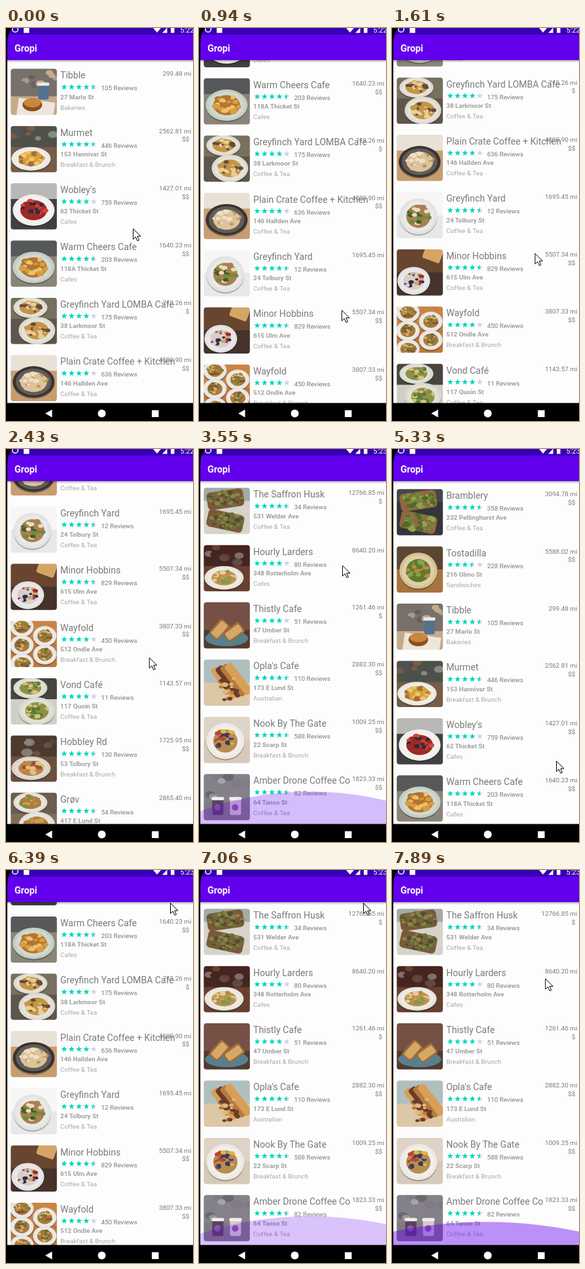
These frames come from a looping animation (286 by 600 pixels, 8 s). An HTML page:

```html
<!DOCTYPE html>
<html lang="en">
<head>
<meta charset="utf-8">
<title>Cafe list</title>
<style>
  html, body { margin: 0; width: 100%; height: 100%; overflow: hidden; background: #000; }
  svg { display: block; width: 286px; height: 600px; }
  text { font: 9.9px Roboto, sans-serif; fill: #7a7a7a; }
  .name { font-size: 14.1px; }
  .addr { font-weight: 700; fill: #a0a0a0; }
  .cat { fill: #a8a8a8; }
  .bar { font-size: 14.3px; font-weight: 700; fill: #fff; }
  .clock { font-size: 11px; fill: #fff; }
  .end { text-anchor: end; }
  .photo { filter: blur(.5px); }
</style>
</head>
<body>
<svg viewBox="0 0 286 600">
  <defs>
    <clipPath id="round"><rect width="70.5" height="70.5" rx="4"/></clipPath>
    <clipPath id="view"><rect x="2" y="49" width="284" height="524"/></clipPath>
    <linearGradient id="shade" x2="0" y2="1">
      <stop stop-opacity=".3"/><stop offset="1" stop-opacity="0"/>
    </linearGradient>
  </defs>
  <rect width="286" height="600" fill="#fdfdfd"/>
  <g clip-path="url(#view)">
    <g id="list"></g>
    <ellipse id="top" rx="426" fill="#6200ee"/>
    <ellipse id="bottom" rx="426" fill="#6200ee"/>
  </g>
  <rect y="49" width="286" height="4" fill="url(#shade)"/>
  <rect y="10" width="286" height="39" fill="#6200ee"/>
  <rect width="286" height="10" fill="#3700b3"/>
  <text class="bar" x="13" y="36">Gropi</text>
  <circle cx="14" cy="2" r="4.3" fill="#3700b3" stroke="#fff" stroke-width="1.5"/>
  <path d="M27 0h8.500v7.500h-8.500zM225 0h12l-6 7zM239 7.500l7.500-8v8zM252 0h5.500v7.500h-5.500z" fill="#fff"/>
  <text class="clock" id="clock" x="266.500" y="6.500"></text>
  <path d="M0 0H10Q2 7 2 25V572.400H286V600H0Z"/>
  <path d="M60 588.500l10.500-6v12zM223 583.500h10.500v10.500h-10.500z" fill="#fff"/>
  <circle cx="146.500" cy="588.500" r="6" fill="#fff"/>
  <path id="cursor" d="M0 0V16L3.800 12.500L6.500 18.500L9 17.400L6.400 11.500H11.500Z" fill="#fff" stroke="#000"/>
</svg>
<script>
const $ = id => document.getElementById(id);
const LOOP = 8000, TICK = 135.8, PITCH = 87.4, TOP = 61;

// Pictures: each layout fills a 70 unit square from a palette of
// backdrop, table, dish and food colours
let seed = 7;
const rnd = () => (seed = seed * 16807 % 2147483647) / 2147483647;
const oval = (x, y, rx, ry, fill) => `<ellipse cx="${x}" cy="${y}" rx="${rx}" ry="${ry}" fill="${fill}"/>`;
const box = (x, y, w, h, fill, turn = 0, r = 0) =>
  `<rect x="${x}" y="${y}" width="${w}" height="${h}" rx="${r}" fill="${fill}" transform="rotate(${turn} ${x + w / 2} ${y + h / 2})"/>`;
const repeat = (n, make) => Array.from({ length: n }, (_, i) => make(i)).join('');

const bits = (n, x, y, rx, ry, size, fills) => repeat(n, i => {
  const a = rnd() * 2 * Math.PI, d = Math.sqrt(rnd()), s = size * (.6 + rnd() * .8);
  return oval((x + Math.cos(a) * d * rx).toFixed(1), (y + Math.sin(a) * d * ry).toFixed(1),
    s.toFixed(1), (s * .7).toFixed(1), fills[i % fills.length]);
});
const room = ([back, table], y) => box(-5, -5, 81, 81, table) + box(-5, -5, 81, y + 5, back);
const blurs = (c, y) => bits(10, 35, y / 2, 36, y / 2, 7, [c[0], c[1], '#5558', '#ddd6']);
const dish = (x, y, r, c, tilt = .75) => {
  const [, , rim, food, ...rest] = c;
  return oval(x, y + 2, r, r * tilt, '#0004') + oval(x, y, r, r * tilt, rim) +
    oval(x, y, r * .85, r * tilt * .85, '#fff3') + oval(x, y, r * .64, r * tilt * .64, food) +
    bits(26, x, y - 1, r * .6, r * tilt * .55, r * .13, [food, ...rest]);
};
const cup = (x, y, w, body, lid) =>
  box(x, y, w, w * 1.5, body, 0, 3) + box(x - 1, y - 2, w + 2, 5, lid, 0, 2);

const layouts = {
  plate: c => room(c, 24) + dish(35, 41, 32, c),
  round: c => room(c, 35) + dish(33, 37, 29, c, .95),
  low: c => room(c, 32) + blurs(c, 32) + dish(31, 50, 30, c, .6),
  cafe: c => room(c, 42) + blurs(c, 42) + box(10, 48, 56, 30, '#eee6da', 8) +
    oval(33, 55, 15, 10, c[4]) + oval(33, 52, 13, 7, c[3]) + cup(42, 23, 16, c[2], '#ece8e2'),
  pair: c => room(c, 32) + dish(30, 15, 26, c, .6) + dish(40, 50, 28, c),
  toastAndBowl: c => room(c, 35) + box(42, -8, 28, 26, c[4], 20, 3) + dish(26, 48, 25, c, .85),
  spread: c => room(c, 35) + repeat(5, i => dish(17 + i % 2 * 35, 9 + i * 14, 18, c, .85)),
  toast: c => room(c, 20) + repeat(2, i => box(5, 4 + i * 33, 56, 27, c[2], i ? 12 : -8, 6) +
    bits(48, 34, 17 + i * 34, 26, 12, 3.2, c.slice(3))),
  sandwich: c => room(c, 42) + oval(35, 55, 33, 12, c[2]) +
    repeat(2, i => box(9 + i * 22, 32 + i * 4, 30, 19, c[4], -48 + i * 12, 3) +
      box(11 + i * 22, 35 + i * 4, 26, 13, c[3], -48 + i * 12, 3)),
  stack: c => room(c, 35) + repeat(4, i => box(4 + i * 7, 29 - i * 2, 56, 13, c[2 + i % 3], 52, 4)) +
    bits(16, 36, 42, 15, 20, 4, c.slice(3)),
  cups: c => room(c, 42) + blurs(c, 40) + repeat(2, i => cup(13 + i * 27, 37, 17, c[2 + i], '#f2edf1') +
    oval(21 + i * 27, 51, 5, 5, c[4]))
};

const TEA = 'Coffee & Tea', CAFE = 'Cafes', BRUNCH = 'Breakfast & Brunch';
// name, address, category, stars, reviews, miles, price, layout, palette
const cafes = [
  ['Bramblery', '232 Pellinghurst Ave', TEA, 4.5, 358, '3094.78', '$$', 'toast', '#45474a #33363a #8f6842 #6d8a35 #8fa648 #4f6a2a'],
  ['Tostadilla', '216 Olmo St', 'Sandwiches', 3.5, 228, '5588.02', '$$', 'round', '#5a4632 #a4743f #d8c193 #5f7a30 #c08a42 #88a445'],
  ['Tibble', '27 Marlo St', 'Bakeries', 4.5, 105, '299.48', '', 'cafe', '#77706b #c3aa8b #53718f #c8873e #8c501f'],
  ['Murmet', '153 Hannivar St', BRUNCH, 4.5, 446, '2562.81', '$$', 'low', '#4d5149 #765c49 #ebe8e3 #d9a23d #efc768 #a46e3b'],
  ["Wobley's", '62 Thicket St', CAFE, 4, 759, '1427.01', '$$', 'plate', '#b9b8b6 #413f40 #f0efed #9f2a24 #d0443a #2f2b42'],
  ['Warm Cheers Cafe', '118A Thicket St', CAFE, 4.5, 203, '1640.23', '$$', 'plate', '#57585a #8b8479 #c4cfc4 #b2762f #d99d41 #edc06c'],
  ['Greyfinch Yard LOMBA Cafe', '38 Larkmoor St', TEA, 4, 175, '718.26', '$', 'pair', '#77705f #5e554d #dedad0 #c39546 #e6cf94 #6a4a3a'],
  ['Plain Crate Coffee + Kitchen', '146 Hallden Ave', TEA, 4, 636, '4500.90', '$$', 'plate', '#e8e1d6 #c79d70 #383431 #dcc39b #f0dfc2 #c1935a'],
  ['Greyfinch Yard', '24 Tolbury St', TEA, 4.5, 12, '1695.45', '', 'round', '#f7f6f5 #e9e8e8 #e4e3e4 #a9814f #6e8b3d #e9ddbb #435d2b'],
  ['Minor Hobbins', '615 Ulm Ave', TEA, 4.5, 829, '5507.34', '$$', 'toastAndBowl', '#68452f #45332b #e4e1e2 #d6cfce #d5a566 #9b2d34 #2f2d42'],
  ['Wayfold', '512 Ondle Ave', BRUNCH, 4, 450, '3807.33', '$$', 'spread', '#c88445 #bd783c #e7e5e1 #aa7b3b #dcb871 #885132 #637a3a'],
  ['Vond Café', '117 Quoin St', TEA, 4, 11, '1143.57', '', 'pair', '#48443f #cfcfc6 #d8dacd #8d9148 #d9c379 #5d7a3a'],
  ['Hobbley Rd', '53 Tolbury St', BRUNCH, 4.5, 130, '1725.95', '$$', 'low', '#4c3a2e #6d503b #d8d3c8 #bd8548 #e3be85 #995231'],
  ['Grøv', '417 E Lund St', TEA, 4.5, 54, '2865.40', '', 'pair', '#6b5d50 #846c56 #e1ded8 #b27a3d #7a9144 #d09b57'],
  ['The Saffron Husk', '531 Welder Ave', TEA, 4.5, 34, '12766.85', '$', 'toast', '#a5aaa6 #d5d3ca #795a38 #6d6e3c #4d502c #8a8449'],
  ['Hourly Larders', '348 Rotterholm Ave', CAFE, 4, 80, '8640.20', '', 'low', '#45251f #68402f #e8e4de #c78f4d #82994d #e4cd9b'],
  ['Thistly Cafe', '47 Umber St', BRUNCH, 4, 51, '1261.46', '$', 'sandwich', '#765045 #54392e #56808f #d6a867 #a06b37'],
  ["Opla's Cafe", '173 E Lund St', 'Australian', 4.5, 110, '2882.30', '$$', 'stack', '#aebfbe #dcc8a7 #d79f57 #693c2b #b77a3d #e0b878'],
  ['Nook By The Gate', '22 Scarp St', BRUNCH, 4.5, 588, '1009.25', '$$', 'round', '#ddd3c6 #d6c9b9 #eeeae3 #b68d54 #e0b648 #b74637 #3d395a'],
  ['Amber Drone Coffee Co', '64 Tanso St', TEA, 4.5, 82, '1823.33', '$$', 'cups', '#84818a #817a82 #5a425b #d9c8ce #8a5aaf']
];

// A half star keeps only the points left of its centre line
const star = (fill, half) => `<polygon fill="${fill}" points="${Array.from({ length: half ? 6 : 10 }, (_, i) => {
  const a = i * Math.PI / 5, r = i % 2 ? 2 : 4.8;
  return [-r * Math.sin(a), -r * Math.cos(a)].map(v => v.toFixed(2));
}).join(' ')}"/>`;

const stars = score => repeat(5, i => {
  const left = score - i;
  return `<g transform="translate(${(89 + i * 11.3).toFixed(1)} 28.2)">` +
    (left < 1 ? star('#d3d3d3') : '') + (left > 0 ? star('#00d6be', left < 1) : '') + '</g>';
});

$('list').innerHTML = cafes.map(([name, addr, cat, score, count, miles, price, layout, palette], i) => `
  <g transform="translate(0 ${(TOP + i * PITCH).toFixed(1)})">
    <g transform="translate(7.3 .3)" clip-path="url(#round)">
      <g class="photo">${layouts[layout](palette.split(' '))}</g>
    </g>
    <text class="name" x="83" y="15.300">${name}</text>${stars(score)}
    <text x="145.500" y="33.300">${count} Reviews</text>
    <text class="addr" x="83" y="46.500">${addr}</text>
    <text class="cat" x="83" y="62.500">${cat}</text>
    <text class="end" x="283.300" y="11.300">${miles} mi</text>
    <text class="end" x="280.300" y="24">${price}</text>
  </g>`).join('');

// The pointer reaches y0 at `ready`, drags to (x, y1) between `from` and `to`,
// then the list glides `toss` further until `stop`
const gestures = [
  { ready: 260, from: 410, to: 670, x: 218.5, y0: 421, y1: 270, toss: 112.5, stop: 1060 },
  { ready: 930, from: 1200, to: 1610, x: 219, y0: 431, y1: 310, toss: 23, stop: 2030 },
  { ready: 1870, from: 2332, to: 2585, x: 219.5, y0: 431, y1: 178, toss: 430, stop: 3430 },
  { ready: 2600, from: 3600, to: 3900, x: 226, y0: 178, y1: 369, toss: -681, stop: 4490 },
  { ready: 4630, from: 4900, to: 5290, x: 251.5, y0: 109.5, y1: 476.5, toss: -20, stop: 5600 },
  { ready: 5300, from: 6010, to: 6380, x: 251.5, y0: 476.5, y1: 50.5, toss: 1100, stop: 7060 },
  { ready: 7350, from: 7500, to: 7880, x: 234.5, y0: 479, y1: 163, toss: 0, stop: 7990 }
];
const START = 173.8, END = 1225.6, SLOP = 7, RETURN = 120, FADE = 540;
const clamp = (v, lo, hi) => Math.min(hi, Math.max(lo, v));
const part = (t, a, b) => clamp((t - a) / (b - a), 0, 1);
const mix = (a, b, p) => a + (b - a) * p;
const NONE = { height: 0, alpha: 0, x: 144 };

function stateAt(t) {
  const now = { scroll: START, x: 194.5, y: 306.5, top: NONE, bottom: NONE };
  for (const g of gestures) {
    const drag = part(t, g.from, g.to), glide = part(t, g.to, g.stop);
    now.x = mix(now.x, g.x, drag);
    now.y = mix(mix(now.y, g.y0, part(t, g.ready - RETURN, g.ready)), g.y1, drag);

    const moved = (g.y0 - g.y1) * drag;
    const wanted = now.scroll + Math.sign(moved) * Math.max(0, Math.abs(moved) - SLOP);
    const held = clamp(wanted, 0, END), pull = (wanted - held) / 308;
    if (pull > 0) now.bottom = { height: 35 * pull, alpha: .43 * pull, x: 144 };

    // A toss that runs into an end makes a glow there
    const side = g.toss < 0 ? 'top' : 'bottom';
    const share = ((g.toss < 0 ? 0 : END) - held) / g.toss;
    if (drag === 1 && share < 1) {
      const hit = mix(g.to, g.stop, 1 - Math.sqrt(1 - Math.max(0, share)));
      const pulse = Math.sin(Math.PI * part(t, hit, hit + FADE));
      if (pulse > .001) now[side] = { height: 49 * pulse, alpha: .26 * pulse, x: 170 };
    }
    now.scroll = clamp(held + g.toss * glide * (2 - glide), 0, END);
  }
  return now;
}

function glow(el, { height, alpha, x }, edge, dir) {
  const ry = 426 * height / 57;
  el.setAttribute('cx', x);
  el.setAttribute('ry', ry);
  el.setAttribute('cy', edge + dir * (ry - height));
  el.setAttribute('opacity', alpha);
}

// The screen refreshes once per tick
function draw(time) {
  const t = Math.floor((time % LOOP + 15) / TICK) * TICK;
  const now = stateAt(t);
  $('list').setAttribute('transform', `translate(0 ${-now.scroll})`);
  $('cursor').setAttribute('transform', `translate(${now.x} ${now.y})`);
  glow($('top'), now.top, 49, -1);
  glow($('bottom'), now.bottom, 572, 1);
  $('clock').textContent = t < 2700 ? '5:22' : '5:23';
}

const start = performance.now();
function tick() {
  draw(performance.now() - start);
  requestAnimationFrame(tick);
}
tick();
</script>
</body>
</html>
```
